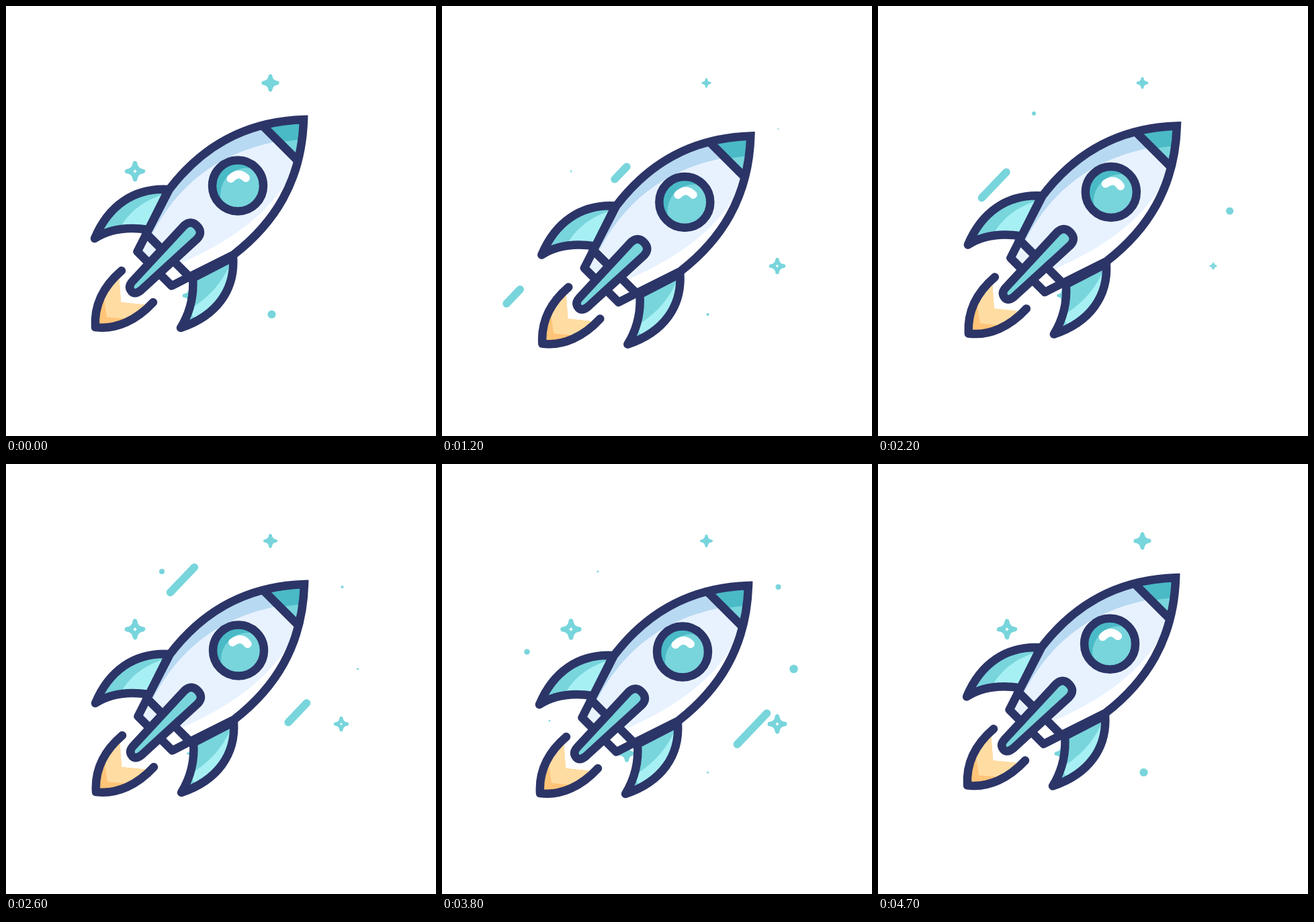
These frames come from a looping animation (640 px wide and 640 px high, 4.8 s). An HTML page:

```html
<!DOCTYPE html>
<html lang="en">
<head>
<meta charset="utf-8">
<title>Rocket</title>
<style>
  html, body { margin: 0; width: 100%; height: 100%; overflow: hidden; background: #fff; }
  svg { display: block; width: 100vw; height: 100vh; }
  .ink { fill: none; stroke: #2c3567; stroke-width: 12.5; stroke-linecap: round; stroke-linejoin: round; }
  .teal { fill: #78d5dc; }
  .deep { fill: #4abac6; }
  .pale { fill: #a6f0f4; }
  .ice { fill: #e8f2ff; }
  .shade { fill: #b8d9f2; }
  .white { fill: #fff; }
  .star { fill: #78d5dc; stroke: #78d5dc; stroke-width: 7; stroke-linejoin: round; }
  .streak { fill: none; stroke: #78d5dc; stroke-width: 11.5; stroke-linecap: round; }
</style>
</head>
<body>
<svg viewBox="0 0 640 640">
  <defs>
    <path id="hull" d="M443 169C350 172 288 214 243 273L209 339L273 403L339 370C398 324 440 262 443 169Z"/>
    <path id="finL" d="M242 273C190 270 152 298 132 346C152 333 180 328 212 333Z"/>
    <path id="finR" d="M338 374C341 422 314 461 260 479C274 456 280 432 278 405Z"/>
    <path id="nozzle" d="M209 339L195.500 365.500L246.500 416.500L273 403Z"/>
    <clipPath id="inHull"><use href="#hull"/></clipPath>
    <clipPath id="inFinL"><use href="#finL"/></clipPath>
    <clipPath id="inFinR"><use href="#finR"/></clipPath>
    <clipPath id="inPane"><circle cx="345" cy="267.5" r="38"/></clipPath>
  </defs>

  <g id="sky"></g>

  <g id="rocket">
    <path fill="#ffc478" d="M168 398C145 417 131 445 133 478C165 482 193 468 211 445L171 441Z"/>
    <path fill="#ffdca2" d="M168 400L171 441L211 445L183 466L150 463L145 430Z"/>
    <path class="ink" d="M172 394C145 417 131 445 133 478C165 482 195 467 219 441"/>

    <g clip-path="url(#inFinL)">
      <rect class="teal" x="120" y="260" width="130" height="100"/>
      <path class="pale" d="M244 278C205 287 178 308 162 345L230 345Z"/>
    </g>
    <use href="#finL" class="ink"/>

    <g clip-path="url(#inFinR)">
      <rect class="teal" x="250" y="365" width="100" height="125"/>
      <path class="pale" d="M336 380C322 410 306 431 273 452L290 485L355 440V375Z"/>
    </g>
    <use href="#finR" class="ink"/>

    <use href="#nozzle" class="ice"/>
    <path class="white" d="M237 366L273 403L247 417L222 392Z"/>
    <use href="#nozzle" class="ink"/>

    <g clip-path="url(#inHull)">
      <rect class="ice" x="190" y="160" width="260" height="250"/>
      <path class="shade" d="M450 160L443 196C335 206 260 253 213 348L190 330L240 200Z"/>
      <path class="white" d="M437 228C404 296 354 342 255 385L274 412L360 390L455 240Z"/>
      <path class="deep" d="M384 181L431 228L460 160Z"/>
      <path class="teal" d="M405 203L450 197L445 240L431 229Z"/>
    </g>
    <path class="ink" d="M384 180L432 228"/>
    <use href="#hull" class="ink" style="stroke-linejoin:miter"/>

    <g clip-path="url(#inPane)">
      <circle class="deep" cx="345" cy="267.5" r="38"/>
      <circle class="teal" cx="359" cy="281" r="40"/>
    </g>
    <circle class="ink" cx="345" cy="267.5" r="38"/>
    <path id="glint" fill="none" stroke="#fff" stroke-width="12" stroke-linecap="round" d="M334.500 257Q346 245 357 256"/>

    <path class="ink" style="fill:#78d5dc" d="M265 327Q275 318 284 327Q294 337 284 347L201 423Q192 430 187 425Q181 418 188 410Z"/>
  </g>
</svg>

<script>
const LOOP = 4800, STEP = 100;

// points the rocket floats through: time, x, y
const path = [
  [0, 0, 0], [700, 18, 13], [1150, 17, 25], [1700, 6.5, 9],
  [2600, 1, 10], [3200, 11, -2], [3800, 13, 12]
];

// twinkles: x, y, radius, moments of full size
const dots = [
  [232, 160, 6, [700, 1640, 2425, 4100]],
  [500.5, 183, 6, [875, 1700, 2870, 3975]],
  [523.5, 305, 6.3, [580, 1620, 2300, 3820]],
  [395.5, 459, 6.3, [925, 1700, 4100, 4750]],
  [160, 382, 5.5, [700, 1620, 4100]],
  [126.5, 279.5, 5.5, [1780, 3660, 4250]]
];
const stars = [
  [393.5, 114.5, 13.5, [985, 2020, 2740, 3330, 3965, 4750]],
  [192, 246, 15.7, [1550, 2560, 2930, 3800, 4750]],
  [499, 387, 14.5, [1085, 1790, 2460, 2990, 3800]],
  [275, 431, 12.8, [1590, 2365, 3800, 4750]]
];
const GLOW = 450;

// streaks: x, y, first launch, tail delay; each flies twice
const streaks = [
  [276, 238, 565, 66],
  [366, 142, 690, 66],
  [265, 266, 690, 200],
  [301, 132, 1895, 66],
  [455, 348, 2480, 66],
  [494, 360, 3098, 90]
];
const RUN = 400, AGAIN = 548, DX = -169, DY = 177;

const $ = id => document.getElementById(id);
function add(tag, attrs, parent = $("sky")) {
  const el = document.createElementNS("http://www.w3.org/2000/svg", tag);
  for (const k in attrs) el.setAttribute(k, attrs[k]);
  return parent.appendChild(el);
}

const ease = u => (1 - Math.cos(Math.PI * Math.min(1, Math.max(0, u)))) / 2;

// swells to 1 at the peak and fades on both sides, across the loop seam
function pulse(t, peak, width) {
  const gap = Math.abs(t - peak);
  return ease(1 - Math.min(gap, LOOP - gap) / width);
}
const glow = (t, peaks) => Math.max(...peaks.map(p => pulse(t, p, GLOW)));

// closed smooth curve through the path points
function key(i) {
  const n = path.length, lap = Math.floor(i / n);
  const [t, x, y] = path[i - lap * n];
  return [t + lap * LOOP, x, y];
}
function drift(t, axis) {
  let i = 0;
  while (key(i + 1)[0] <= t) i++;
  const a = key(i), b = key(i + 1), span = b[0] - a[0];
  const slope = j => {
    const p = key(j - 1), q = key(j + 1);
    return (q[axis] - p[axis]) / (q[0] - p[0]) * span;
  };
  const u = (t - a[0]) / span, v = 1 - u;
  return a[axis] * (1 + 2 * u) * v * v + slope(i) * u * v * v
       + b[axis] * u * u * (3 - 2 * u) - slope(i + 1) * u * u * v;
}

const STAR = "M0-12.200Q1.200-1.200 12.200 0Q1.200 1.200 0 12.200Q-1.200 1.200-12.200 0Q-1.200-1.200 0-12.200Z";
const SPARK = "M0-3.200Q.7-.7 3.200 0Q.7 .7 0 3.200Q-.7 .7-3.200 0Q-.7-.7 0-3.200Z";

const dotEls = dots.map(([cx, cy]) => add("circle", { cx, cy, class: "teal" }));
const starEls = stars.map(([, , size]) => {
  const g = add("g", {});
  add("path", { d: STAR, class: "star" }, g);
  if (size > 14) add("path", { d: SPARK, class: "white" }, g);
  return g;
});
const flights = streaks.flatMap(([x, y, first, lag]) =>
  [first, first + AGAIN].map(start => ({ x, y, start, lag, el: add("path", { class: "streak" }) })));

function draw(t) {
  $("rocket").setAttribute("transform", `translate(${drift(t, 1)} ${drift(t, 2)})`);
  $("glint").setAttribute("transform", `rotate(${12 * pulse(t, 2150, 1300)} 345 267.5)`);

  dots.forEach(([, , r, peaks], i) => dotEls[i].setAttribute("r", r * glow(t, peaks)));
  stars.forEach(([x, y, r, peaks], i) => starEls[i].setAttribute("transform",
    `translate(${x} ${y}) scale(${r / 15.7 * glow(t, peaks)})`));

  for (const { x, y, start, lag, el } of flights) {
    const age = t - start;
    const on = age >= 0 && age < RUN + lag;
    el.style.display = on ? "" : "none";
    const point = u => `${x + DX * u} ${y + DY * u}`;
    el.setAttribute("d", `M${point(ease((age - lag) / RUN))}L${point(ease(age / RUN))}`);
  }
}

const begin = performance.now();
function tick() {
  const t = (performance.now() - begin) % LOOP;
  draw(Math.floor(t / STEP) * STEP);
  requestAnimationFrame(tick);
}
tick();
</script>
</body>
</html>
```
